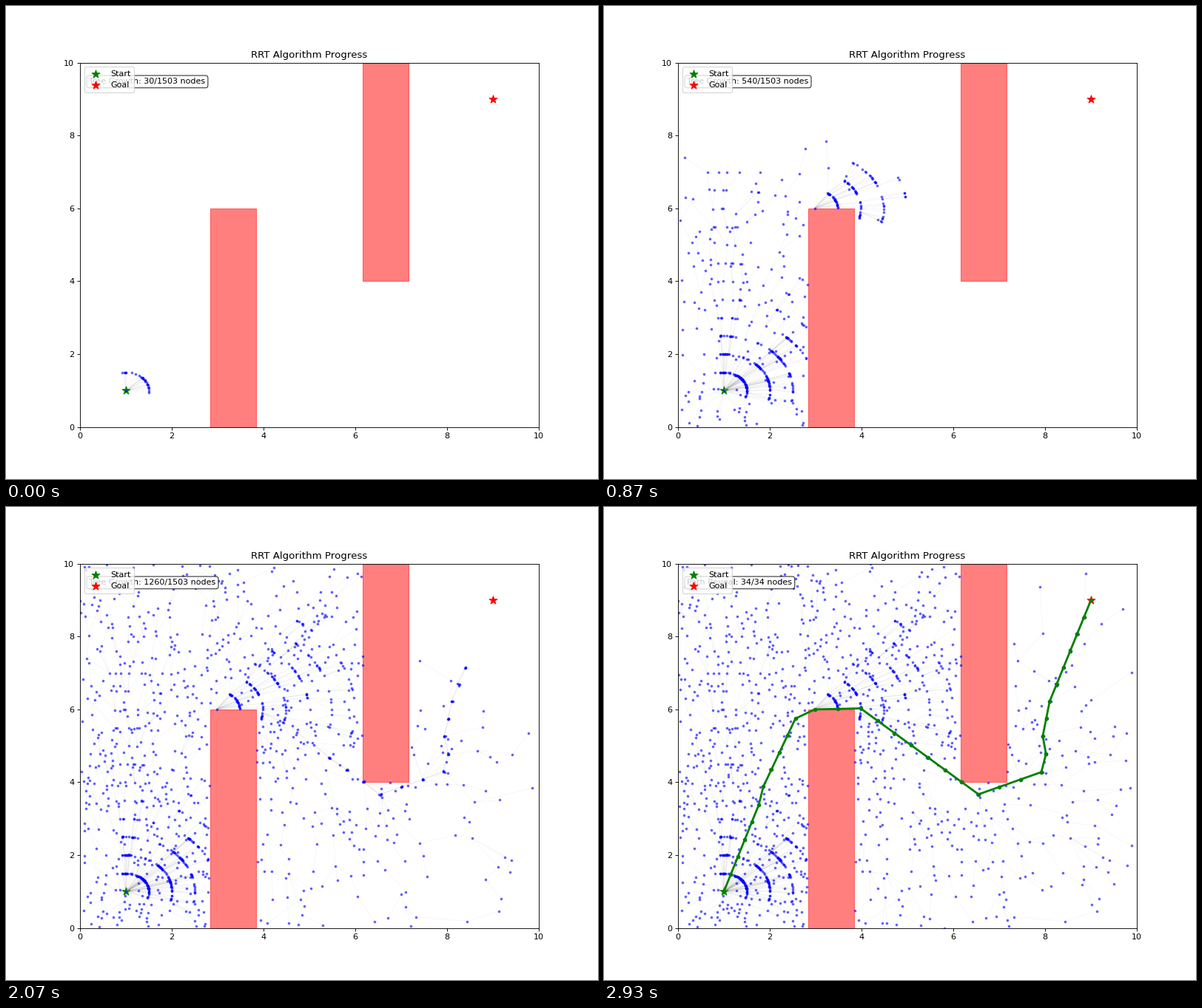
A matplotlib script that plays this animation: 800 by 640 pixels, repeating every 3 s.

```python
import numpy as np
import matplotlib.pyplot as plt
from matplotlib.animation import FuncAnimation
from matplotlib.collections import LineCollection
from matplotlib.patches import Rectangle

FRAMES, INTERVAL = 100, 30
PICTURES, LEAD = 45, 25  # pictures per loop, ms shown ahead of the clock
TOTAL, STEP = 1503, 0.5
GROW_TICKS = 51
WALLS = [(17 / 6, 0, 1, 6), (37 / 6, 4, 1, 6)]
START, GOAL = (1, 1), (9, 9)
BENDS = [START, (1.76, 3.38), (1.86, 3.88), (2.56, 5.75), (2.98, 6), (3.98, 6.03),
         (6.55, 3.67), (7.92, 4.28), (8.02, 4.78), (7.95, 5.27), (8.1, 6.22), GOAL]

# Wall corners that the shortest way from the start turns around
HUBS = np.array([START, (2.83, 6), (3.83, 6), (6.17, 4), (7.17, 4)])
HUB_COST = np.r_[0, np.cumsum(np.hypot(*np.diff(HUBS, axis=0).T))]


def subdivide(bends):
    pts = [bends[0]]
    for a, b in zip(bends, bends[1:]):
        n = round(np.hypot(b[0] - a[0], b[1] - a[1]) / STEP)
        pts.extend(np.linspace(a, b, n + 1)[1:])
    return np.array(pts, float)


def hub_of(x, y):
    if x < 2.84:
        return 0
    if x < 6.167:
        return 1 if y >= 6 else 2
    return 3 if y < 4 else 4


def travel(x, y):
    h = hub_of(x, y)
    return HUB_COST[h] + np.hypot(x - HUBS[h][0], y - HUBS[h][1])


def blocked(x, y):
    return any(a < x < a + w and b < y < b + h for a, b, w, h in WALLS)


def fan(rng, center, base, span, goal_angle, rings, count, decay):
    """Nodes on rings one step apart, gathered along shared rays."""
    rays = np.r_[rng.uniform(*span, 18), goal_angle, goal_angle]
    found = []
    for k in range(1, rings + 1):
        n = round(count * np.exp((1 - k) / decay))
        r = k * STEP
        for a in np.radians(rng.choice(rays, n) + rng.normal(0, 6 / k, n)):
            x, y = center + r * np.array([np.cos(a), np.sin(a)])
            if abs(travel(x, y) - base - r) < 0.3:
                found.append((base + r, x, y))
    return found


def grow_tree(path):
    rng = np.random.default_rng(12)
    nodes = [(0, *START)]
    nodes += fan(rng, path[0], 0, (-12, 98), 45, 12, 85, 5)
    nodes += fan(rng, path[11], HUB_COST[1], (-16, 55), 26.5, 7, 34, 9)
    for i, p in enumerate(path[1:-1], 1):
        twins = 4 if i > 16 else 1
        nodes += [(i * STEP, *q) for q in rng.normal(p, 0.012, (twins, 2))]

    # Loose nodes fill the free space, thinner and later further away
    loose = np.empty((0, 2))
    while len(nodes) < TOTAL - 1:
        x, y = rng.uniform(0, 10, 2)
        cost = travel(x, y)
        if blocked(x, y) or rng.random() > np.exp(-(cost / 11) ** 3):
            continue
        if len(loose) and np.hypot(*(loose - (x, y)).T).min() < 0.07:
            continue
        loose = np.vstack([loose, (x, y)])
        detour = max(17.2 - cost, 0.5) * rng.random() ** 1.3
        nodes.append((cost + detour, x, y))
    nodes.sort(key=lambda node: node[0])
    return np.array([node[1:] for node in nodes] + [GOAL], float)


def link(pts):
    edges = []
    for i in range(1, len(pts)):
        p = pts[i]
        back = HUBS[hub_of(*p)] - p
        aim = p + back * min(1, STEP / max(np.hypot(*back), 1e-9))
        j = np.argmin(np.hypot(*(pts[:i] - aim).T))
        edges.append((pts[j], p))
    return edges


path = subdivide(BENDS)
nodes = grow_tree(path)
edges = link(nodes)

fig, ax = plt.subplots(figsize=(10, 8), dpi=80)
ax.set(xlim=(0, 10), ylim=(0, 10), title="RRT Algorithm Progress")
for x, y, w, h in WALLS:
    ax.add_patch(Rectangle((x, y), w, h, color="red", alpha=0.5))
ax.scatter(*START, c="green", marker="*", s=100, label="Start")
ax.scatter(*GOAL, c="red", marker="*", s=100, label="Goal")
ax.legend(loc="upper left")

branches = ax.add_collection(LineCollection(
    [], colors="gray", linewidths=0.5, alpha=0.1, zorder=1.5), autolim=False)
dots, = ax.plot([], [], "o", color="blue", ms=3.2, mew=0, alpha=0.62)
route, = ax.plot([], [], "o-", color="green", lw=2.5, ms=4, zorder=2.4)
status = ax.text(0.02, 0.942, "", transform=ax.transAxes,
                 bbox=dict(boxstyle="round", facecolor="white", alpha=0.8))


def draw(i):
    picture = (i * INTERVAL + LEAD) * PICTURES // (FRAMES * INTERVAL)
    tick = round(picture * 4 / 3)
    shown = min(30 * (tick + 1), TOTAL)
    steps = 0
    if tick < GROW_TICKS:
        status.set_text(f"Tree Growth: {shown}/{TOTAL} nodes")
    else:
        steps = min(4 * (tick - GROW_TICKS + 1), len(path))
        status.set_text(f"Path Reveal: {steps}/{len(path)} nodes")
    branches.set_segments(edges[:shown - 1])
    dots.set_data(*nodes[:shown].T)
    route.set_data(*path[:steps].T)
    return branches, dots, route, status


anim = FuncAnimation(fig, draw, frames=FRAMES, interval=INTERVAL,
                     repeat=True, repeat_delay=0)
plt.show()
```
